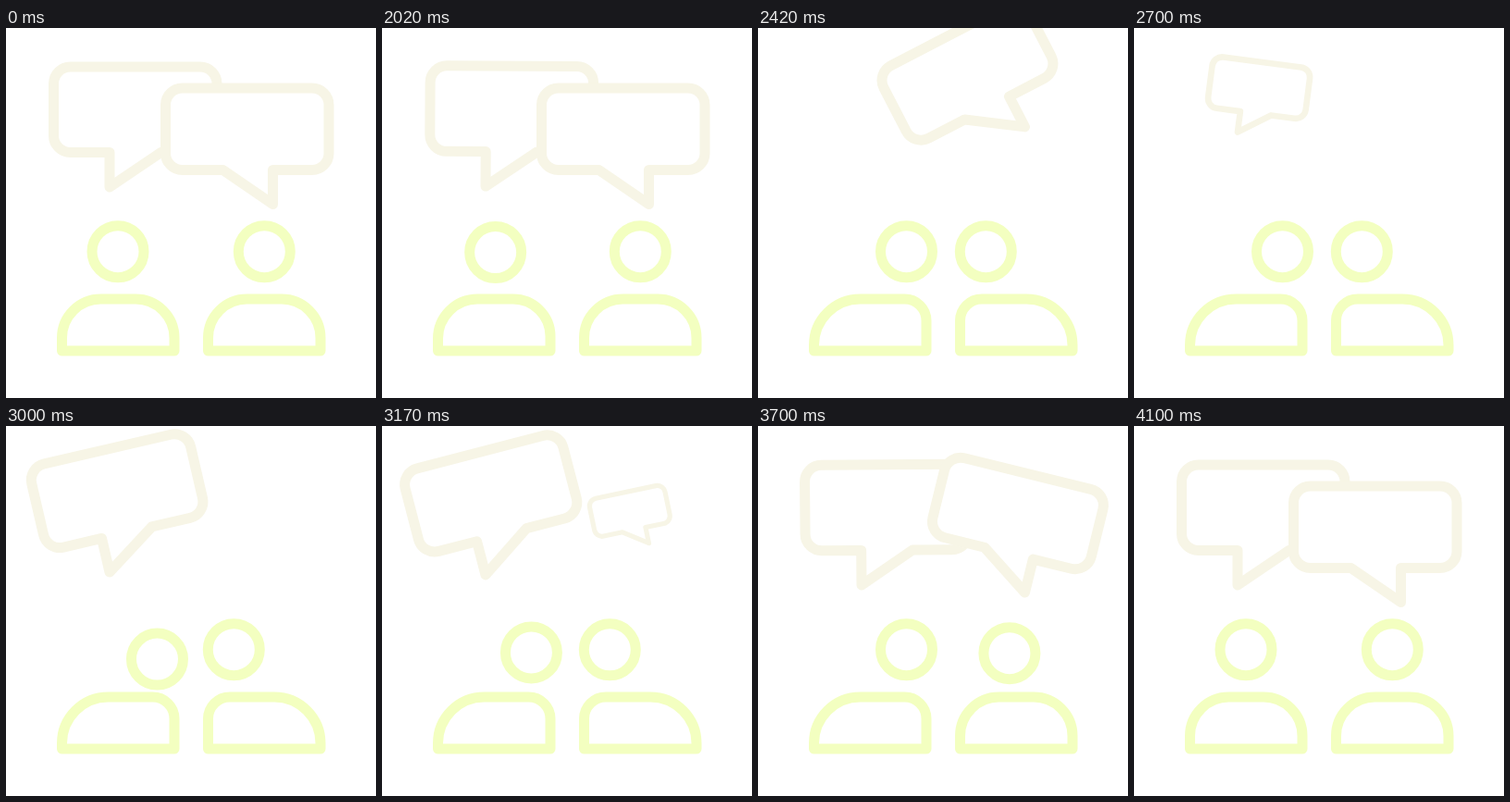
These frames come from a looping animation (400x400 px, 4.12 s). An HTML page:

```html
<!DOCTYPE html>
<html lang="en">
<head>
<meta charset="utf-8">
<title>Conversation</title>
<style>
  html, body { margin: 0; width: 100%; height: 100%; overflow: hidden; background: #fff; }
  svg { display: block; width: 100vw; height: 100vh; }

  .bubble { fill: #fff; stroke: #f7f5e6; }
  .person { fill: none; stroke: #f3ffc0; }
  .bubble, .person { stroke-width: 11; stroke-linejoin: round; }

  .bubble, .head, .body {
    animation-duration: 4120ms;
    animation-iteration-count: infinite;
    animation-timing-function: linear;
  }

  /* Bubbles turn and travel about the tip of the tail */
  .bubble.left { transform-origin: 112px 172px; animation-name: lift-l, tilt-l, pop-l; }
  .bubble.right { transform-origin: 288.5px 190.5px; animation-name: lift-r, tilt-r, pop-r; }
  .head.left { animation-name: head-l; }
  .head.right { animation-name: head-r; }
  .body.left { animation-name: body-l; }
  .body.right { animation-name: body-r; }

  @keyframes lift-l {
    0% { translate: 0 0; }
    48.42% { translate: 0 0; animation-timing-function: cubic-bezier(.333, 0, .667, .333); }
    58.74% { translate: 0 -240px; animation-timing-function: step-end; }
    63.59% { translate: 0 -75px; }
    69.17% { translate: 0 -31px; }
    72.82% { translate: 0 -14px; }
    77.67% { translate: 0 -10.5px; }
    81.31% { translate: 0 -4px; }
    84.95%, 100% { translate: 0 0; }
  }
  @keyframes tilt-l {
    0% { rotate: 0deg; }
    48.42% { rotate: 0deg; animation-timing-function: ease-in-out; }
    58.74% { rotate: 42deg; animation-timing-function: step-end; }
    63.59% { rotate: 25deg; animation-timing-function: ease-out; }
    69.17% { rotate: -9.3deg; }
    72.82% { rotate: -13deg; animation-timing-function: ease-out; }
    74.76% { rotate: -15.5deg; animation-timing-function: ease-in-out; }
    81.31% { rotate: -11.8deg; animation-timing-function: ease-in-out; }
    89.81% { rotate: -.5deg; }
    90.78%, 100% { rotate: 0deg; }
  }
  @keyframes pop-l {
    0% { scale: 1; }
    58.74% { scale: 1; animation-timing-function: step-start; }
    63.59% { scale: 0; animation-timing-function: ease-out; }
    68.2%, 100% { scale: 1; }
  }

  @keyframes lift-r {
    0% { translate: 0 0; }
    52.67% { translate: 0 0; animation-timing-function: cubic-bezier(.333, 0, .667, .333); }
    62.99% { translate: 0 -240px; animation-timing-function: step-end; }
    75.49% { translate: 0 -75px; }
    81.31% { translate: 0 -31px; }
    84.95% { translate: 0 -16px; }
    89.81% { translate: 0 -10.5px; }
    93.45% { translate: 0 -4px; }
    97.09%, 100% { translate: 0 0; }
  }
  @keyframes tilt-r {
    0% { rotate: 0deg; }
    52.67% { rotate: 0deg; animation-timing-function: ease-in-out; }
    62.99% { rotate: -42deg; animation-timing-function: step-end; }
    75.49% { rotate: -25deg; animation-timing-function: ease-out; }
    81.31% { rotate: 9.3deg; }
    84.95% { rotate: 14deg; animation-timing-function: ease-out; }
    87.14% { rotate: 16.5deg; animation-timing-function: ease-in-out; }
    89.81% { rotate: 13.8deg; animation-timing-function: ease-in-out; }
    99.27%, 100% { rotate: 0deg; }
  }
  @keyframes pop-r {
    0% { scale: 1; }
    62.99% { scale: 1; animation-timing-function: step-start; }
    75.49% { scale: 0; animation-timing-function: ease-out; }
    80.1%, 100% { scale: 1; }
  }

  /* Heads swing along a shallow dip, then nod while speaking */
  @keyframes head-l {
    0%, 48.42% { translate: 0 0; }
    49.03% { translate: 1.5px .8px; }
    51.94% { translate: 20px 5.5px; animation-timing-function: ease-out; }
    55.34% { translate: 39.5px 0; }
    65.53% { translate: 39.5px 0; animation-timing-function: ease-in-out; }
    72.33% { translate: 42.5px 10.5px; animation-timing-function: ease-in-out; }
    79.85% { translate: 39.5px 0; }
    90.29% { translate: 39.5px 0; animation-timing-function: ease-in; }
    94.66% { translate: 20px 5.5px; animation-timing-function: ease-out; }
    99.27%, 100% { translate: 0 0; }
  }
  @keyframes head-r {
    0% { translate: 0 0; }
    50.49% { translate: 0 0; animation-timing-function: ease-in; }
    53.88% { translate: -16.5px 5.5px; animation-timing-function: ease-out; }
    57.28% { translate: -33px 0; }
    76.46% { translate: -33px 0; animation-timing-function: ease-in-out; }
    82.04% { translate: -33px 9.5px; animation-timing-function: ease-in-out; }
    85.68% { translate: -33px 4px; }
    87.86% { translate: -20px 5.5px; }
    89.81% { translate: -7.5px 4px; animation-timing-function: ease-out; }
    92.23%, 100% { translate: 0 0; }
  }

  /* Shoulders: even when facing front, steeper on the inner side when turned */
  .body { d: path("M60.5 349V335A42 42 0 0 1 102.5 293H140A42 42 0 0 1 182 335V349Z"); }
  @keyframes body-l {
    48.42%, 99.27% { d: path("M60.5 349V335A42 42 0 0 1 102.5 293H140A42 42 0 0 1 182 335V349Z"); }
    55.34%, 91.26% { d: path("M60.5 349V343A50 50 0 0 1 110.5 293H158.5A23.5 23.5 0 0 1 182 316.5V349Z"); }
  }
  @keyframes body-r {
    50.49%, 89.81% { d: path("M60.5 349V335A42 42 0 0 1 102.5 293H140A42 42 0 0 1 182 335V349Z"); }
    57.28%, 85.2% { d: path("M60.5 349V343A50 50 0 0 1 110.5 293H158.5A23.5 23.5 0 0 1 182 316.5V349Z"); }
  }
</style>
</head>
<body>
<svg viewBox="0 0 400 400">
  <g class="person">
    <circle class="head left" cx="121" cy="241.7" r="28"/>
    <circle class="head right" cx="279.3" cy="241.7" r="28"/>
    <path class="body left"/>
    <g transform="matrix(-1 0 0 1 400.5 0)"><path class="body right"/></g>
  </g>
  <path class="bubble left" d="M69.5 42H210A18 18 0 0 1 228 60V116.5A18 18 0 0 1 210 134.5H167.5L112 172V134.5H69.5A18 18 0 0 1 51.5 116.5V60A18 18 0 0 1 69.5 42Z"/>
  <path class="bubble right" d="M190.5 65H331A18 18 0 0 1 349 83V135.5A18 18 0 0 1 331 153.5H288.5V190.5L234.5 153.5H190.5A18 18 0 0 1 172.5 135.5V83A18 18 0 0 1 190.5 65Z"/>
</svg>
</body>
</html>
```
